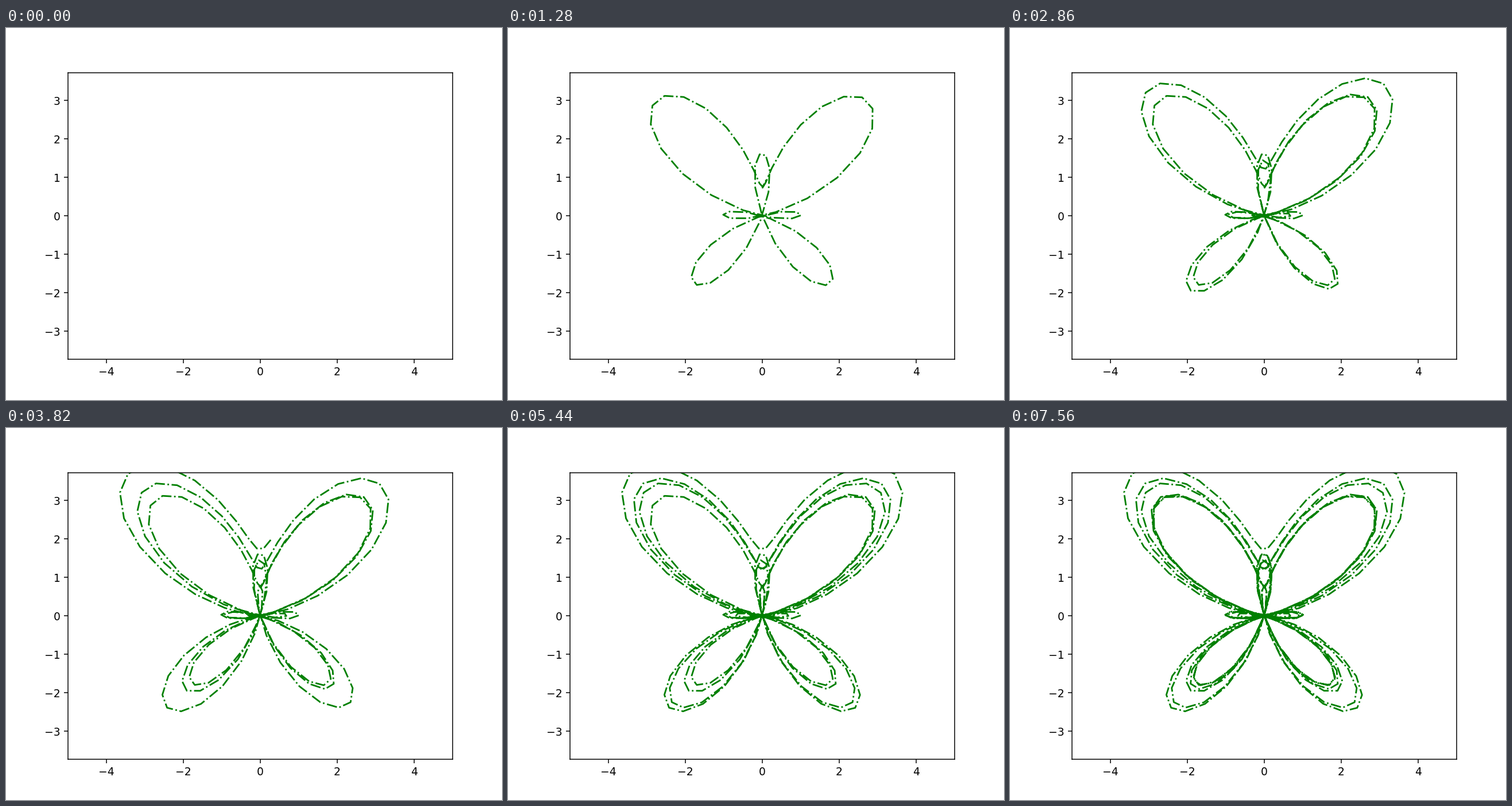
Write a matplotlib script that moves like this. It is 864 px wide and 648 px high and loops after 7.58 s.

```python
import numpy as np
import matplotlib.pyplot as plt
from matplotlib.animation import FuncAnimation

FRAMES = 379
HOLDS = (183, 196)  # short pauses while the pen is above the axes

t = np.arange(0, 12 * np.pi, 0.1)
r = np.exp(np.cos(t)) - 2 * np.cos(4 * t) + np.sin(t / 12) ** 5
x, y = r * np.sin(t), r * np.cos(t)

fig, ax = plt.subplots(figsize=(6.4, 4.8), dpi=135)
box = ax.get_position()
half_w = 5
half_h = half_w * (box.height * 4.8) / (box.width * 6.4)
ax.set(xlim=(-half_w, half_w), ylim=(-half_h, half_h))
line, = ax.plot([], [], "g-.", lw=1.5)


def init():
    line.set_data([], [])
    return line,


def update(n):
    last = n - sum(n > h for h in HOLDS)
    line.set_data(x[:last + 1], y[:last + 1])
    return line,


anim = FuncAnimation(fig, update, frames=FRAMES, init_func=init,
                     interval=20, blit=True, repeat=True, repeat_delay=0)
plt.show()
```
